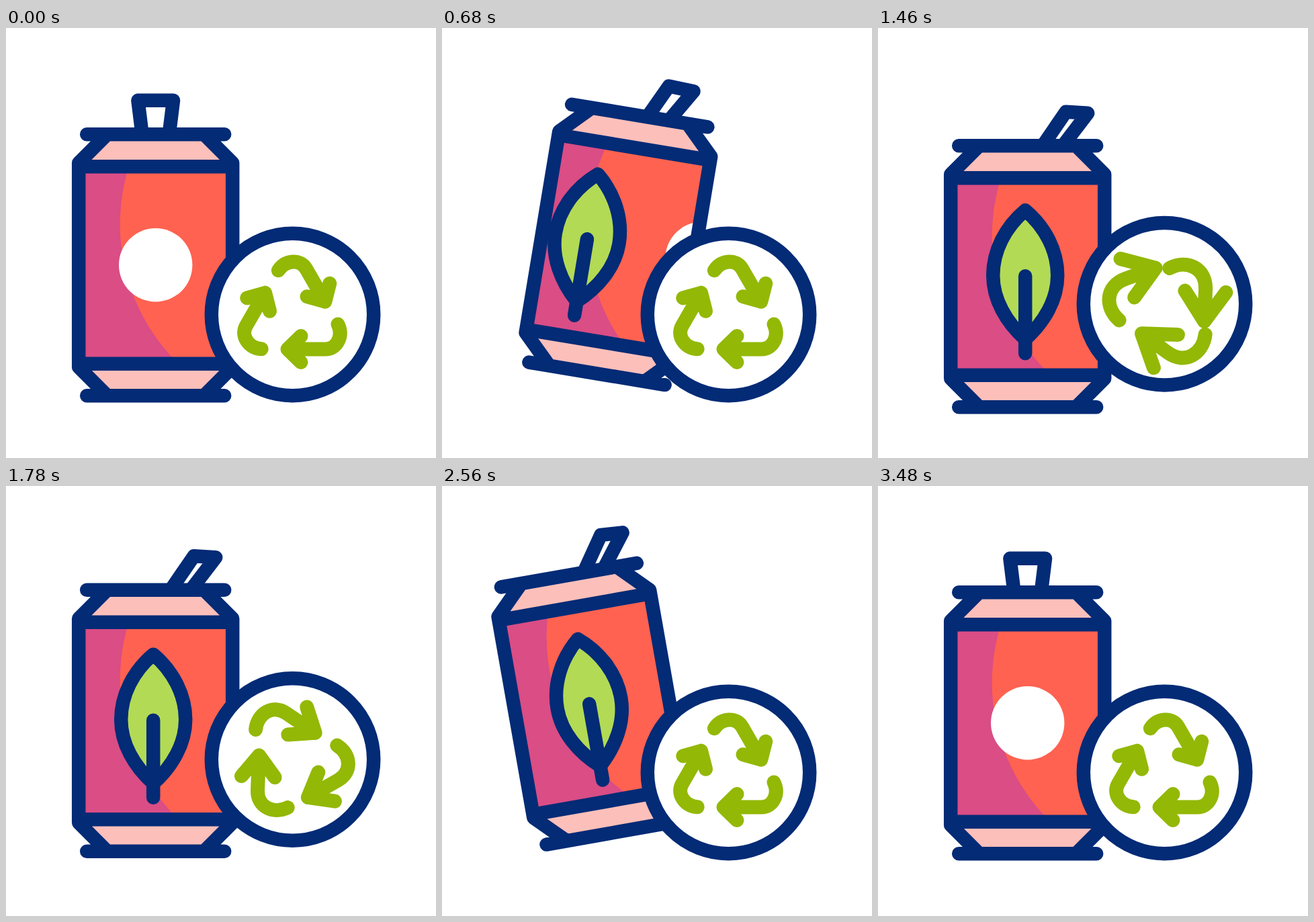
Recreate the animation shown at these times as an HTML page. Size 640 by 640 pixels, loop 3600 ms.

```html
<!DOCTYPE html>
<html lang="en">
<head>
<meta charset="utf-8">
<title>Can recycling</title>
<style>
  html, body { margin: 0; width: 100%; height: 100%; overflow: hidden; background: #fff; }
  svg { display: block; width: 100vw; height: 100vh; }
  .line, .arrow { fill: none; stroke: #032b76; stroke-width: 20.5; stroke-linecap: round; stroke-linejoin: round; }
  .arrow { stroke: #93b805; stroke-width: 21; }
</style>
</head>
<body>
<svg viewBox="0 0 640 640">
  <defs>
    <clipPath id="label"><rect x="-114" y="-146" width="228" height="292"/></clipPath>
  </defs>
  <g id="can">
    <path id="tab" class="line"/>
    <path fill="#fdbfba" d="M-72-194H72L114-152V152L72 194H-72L-114 152V-152Z"/>
    <g clip-path="url(#label)">
      <rect x="-114" y="-146" width="228" height="292" fill="#da4d85"/>
      <circle cx="237" cy="-60" r="290" fill="#ff6250"/>
      <circle id="dot" r="54.7" fill="#fff"/>
      <g id="leaf">
        <path class="line" style="fill:#b3da55" d="M0-99C30-74 48-38 48-2S28 68 0 93C-28 68-48 34-48-2S-30-74 0-99Z"/>
        <path class="line" d="M0-1V114"/>
      </g>
    </g>
    <path class="line" d="M-72-194.5L-114.5-152V152L-72 194.5M72-194.5L114.5-152V152L72 194.5
      M-102.5-194.5H102.5M-102.5 194.5H102.5M-114-146.5H114M-114 147H114"/>
  </g>
  <g id="badge">
    <circle class="line" style="fill:#fff" r="120.7"/>
    <path class="arrow"/><path class="arrow"/><path class="arrow"/>
  </g>
</svg>
<script>
const LOOP = 3600;
const $ = id => document.getElementById(id);
const arrows = document.querySelectorAll('.arrow');
const mix = (a, b, k) => a + (b - a) * k;
const place = (el, x, y, angle = 0) =>
  el.setAttribute('transform', `translate(${x} ${y}) rotate(${angle})`);

// Smooth step from 0 to 1 between two times.
function ease(t, start, end) {
  const u = Math.min(1, Math.max(0, (t - start) / (end - start)));
  return u * u * (3 - 2 * u);
}
// Rises from a to b, holds, falls from c to d.
const pulse = (t, a, b, c, d) => ease(t, a, b) - ease(t, c, d);

function drawCan(t) {
  const x = 40 * pulse(t, 330, 700, 700, 1115) - 64 * pulse(t, 2560, 3100, 3100, 3480);
  const y = 18.3 * pulse(t, 815, 1380, 1380, 2220)
    - 35 * pulse(t, 235, 815, 815, 1380) - 28.5 * pulse(t, 1380, 2220, 2900, 3480);
  const tilt = 10 * (pulse(t, 0, 340, 630, 980) - pulse(t, 2180, 2540, 3180, 3480));
  place($('can'), 222.7 + x, 352.7 + y, tilt);

  // The label slides round as the tab swings to the right.
  const p = pulse(t, 330, 855, 2740, 3350);
  const m = (a, b) => mix(a, b, p);
  $('tab').setAttribute('d',
    `M${m(-20, 22)}-194L${m(-26.3, 57)}-245L${m(26.3, 89.5)} ${m(-245, -243)}L${m(20, 52)}-194`);
  place($('dot'), 170 * p, 0);
  place($('leaf'), 170 * p - 173.5, 0.5);
}

function drawBadge(t) {
  place($('badge'), 426.5, 426.5 - 19.5 * pulse(t, 1100, 1600, 2160, 2560));

  // Arrows stretch while they turn, each lagging a little behind the next.
  const spin = 120 * ease(t, 1100, 2090);
  const k = pulse(t, 1100, 1460, 1460, 2090);
  const m = (a, b) => mix(a, b, k);
  const spread = m(19.5, 30.5), wing = m(12.5, 37);
  const shape = `M${m(67.5, 69.6)} ${m(14.5, -3.4)}C${m(76, 84)} ${m(32, 22)} ${m(66, 72)} 51.5 ${m(49, 40)} 51.5H-7.5
    M${wing} ${51.5 - spread}L-7.5 51.5L${wing} ${51.5 + spread}`;
  arrows.forEach((arrow, i) => {
    const j = i - 1;
    arrow.setAttribute('d', shape);
    place(arrow, k * (2.5 + 5.5 * j), k * (7 + 9.5 * j), spin - j * (120 + 4 * k));
  });
}

function frame() {
  const t = performance.now() % LOOP;
  drawCan(t);
  drawBadge(t);
  requestAnimationFrame(frame);
}
frame();
</script>
</body>
</html>
```
